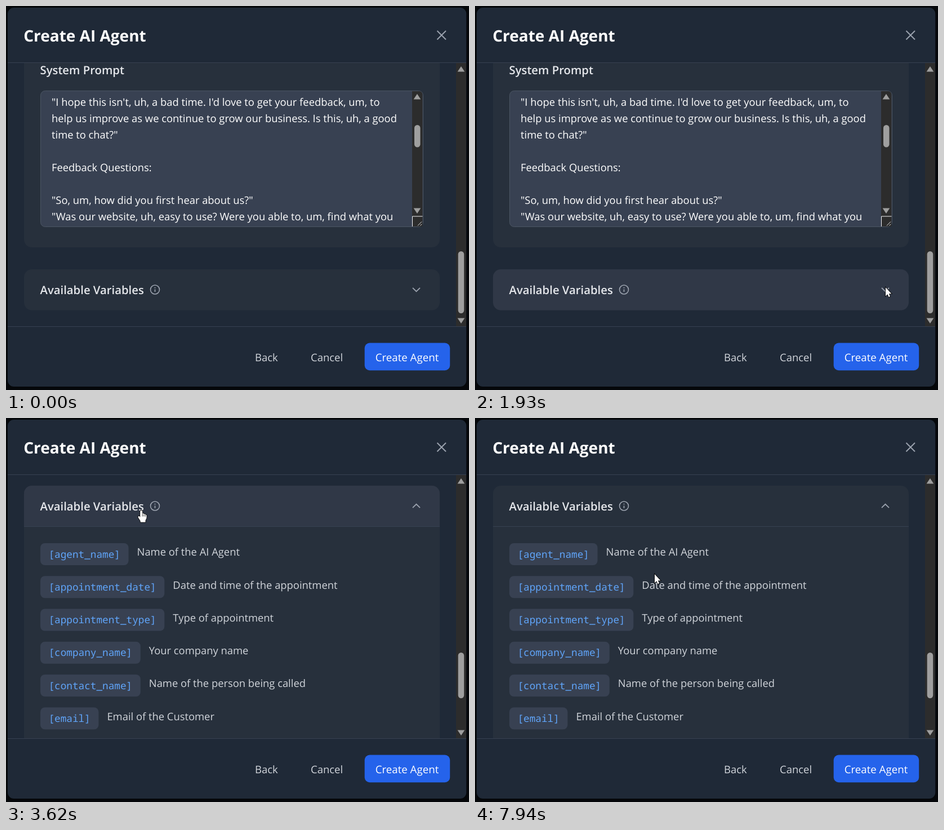
An HTML page with a canvas that plays this animation: 822x681 px, repeating every 8000 ms.

```html
<!DOCTYPE html>
<html lang="en">
<head>
<meta charset="utf-8">
<title>Create AI Agent</title>
<style>
html, body { margin: 0; width: 100%; height: 100%; overflow: hidden; background: #05070a; }
canvas { display: block; width: 822px; height: 681px; }
</style>
</head>
<body>
<canvas id="stage" width="822" height="681"></canvas>
<script>
const ctx = document.getElementById('stage').getContext('2d');
const LOOP = 8000, OPEN = 2000;
const SANS = '"Open Sans", "Noto Sans", sans-serif';
const MONO = '"Noto Sans Mono", "DejaVu Sans Mono", monospace';
const C = {
  panel: '#1f2937', card: '#27303c', hover: '#303847', line: '#374151', field: '#384152',
  edge: '#4b5563', icon: '#9ca3af', soft: '#d1d5db', head: '#e5e7eb', track: '#2c2c2c', thumb: '#9f9f9f'
};

const PROMPT = [
  '"I hope this isn\'t, uh, a bad time. I\'d love to get your feedback, um, to',
  'help us improve as we continue to grow our business. Is this, uh, a good',
  'time to chat?"', '', 'Feedback Questions:', '',
  '"So, um, how did you first hear about us?"',
  '"Was our website, uh, easy to use? Were you able to, um, find what you'
];
const VARS = [
  ['agent_name', 'Name of the AI Agent'],
  ['appointment_date', 'Date and time of the appointment'],
  ['appointment_type', 'Type of appointment'],
  ['company_name', 'Your company name'],
  ['contact_name', 'Name of the person being called'],
  ['email', 'Email of the Customer']
];
const TIP = [
  'Dynamic variables allow you', 'to personalize your agent\'s', 'responses with context-',
  'specific information that will', 'be replaced at runtime.'
];

// Pointer path: time, x, y
const PATH = [
  [390, 726, 672], [520, 724, 640], [680, 721, 580], [840, 718, 524], [1000, 717, 498],
  [1150, 718, 499], [1200, 721, 499], [1390, 729, 499], [2440, 729, 499], [2660, 700, 487],
  [2860, 638, 452], [3040, 400, 330], [3220, 194, 221], [3280, 188, 186], [3480, 212, 172],
  [3700, 256, 159], [3880, 264, 158], [7409, 264, 158], [7410, 265, 164], [7500, 267, 173],
  [7630, 276, 196], [7780, 300, 245], [7940, 319, 277], [LOOP, 319, 277]
];

const clamp = v => Math.max(0, Math.min(1, v));
const pulse = (t, on, off, d = 150) => clamp((t - on) / d) * (1 - clamp((t - off) / d));

function pointer(t) {
  if (t < PATH[0][0]) return null;
  const i = Math.max(1, PATH.findIndex(p => p[0] > t));
  const [a, b] = [PATH[i - 1], PATH[i]];
  const k = (t - a[0]) / (b[0] - a[0]);
  return { x: a[1] + (b[1] - a[1]) * k, y: a[2] + (b[2] - a[2]) * k };
}

function box(x, y, w, h, r, fill, stroke) {
  ctx.beginPath();
  ctx.roundRect(x, y, w, h, r);
  if (fill) { ctx.fillStyle = fill; ctx.fill(); }
  if (stroke) { ctx.strokeStyle = stroke; ctx.lineWidth = 1; ctx.stroke(); }
}

function text(s, x, y, size, color, weight = 400, family = SANS, align = 'left') {
  ctx.font = `${weight} ${size}px ${family}`;
  ctx.textAlign = align;
  ctx.fillStyle = color;
  ctx.fillText(s, x, y);
}

function poly(points, { stroke, fill, width = 1.7, close = false }) {
  ctx.beginPath();
  points.forEach(([x, y]) => ctx.lineTo(x, y));
  if (close) ctx.closePath();
  if (stroke) { ctx.strokeStyle = stroke; ctx.lineWidth = width; ctx.stroke(); }
  if (fill) { ctx.fillStyle = fill; ctx.fill(); }
}

function arrowhead(x, y, dir) {
  poly([[x - 5, y + 3.7 * dir], [x, y - 3.7 * dir], [x + 5, y + 3.7 * dir]],
    { fill: C.thumb, stroke: C.thumb, width: 1.4, close: true });
}

function faded(alpha, draw) {
  if (alpha <= 0) return;
  ctx.save();
  ctx.globalAlpha = alpha;
  draw();
  ctx.restore();
}

function clipped(x, y, w, h, draw) {
  ctx.save();
  ctx.beginPath();
  ctx.rect(x, y, w, h);
  ctx.clip();
  draw();
  ctx.restore();
}

function promptCard() {
  box(32, 60, 738, 368, 14, C.card);
  text('System Prompt', 60.5, 121, 20.3, C.head, 600);
  box(61.5, 150.5, 679, 241, 8, C.field, C.edge);
  clipped(62, 151, 660, 240, () =>
    PROMPT.forEach((s, i) => text(s, 81, 177 + i * 29.05, 18.37, '#fff')));
  box(721, 151, 18.5, 222, [0, 6, 0, 0], C.track);
  arrowhead(730, 161, 1);
  arrowhead(730, 363, -1);
  box(725, 211, 10.5, 39.5, 5.2, C.thumb);
  box(721, 372.5, 18.5, 18.5, 0, C.track);
  poly([[721.5, 391], [721.5, 373], [739.5, 373]], { stroke: '#f3f4f6', width: 1 });
  poly([[731, 389.5], [738, 382.5]], { stroke: '#e5e7eb', width: 1 });
  poly([[735.5, 389.5], [738, 387]], { stroke: '#e5e7eb', width: 1 });
}

function variablesHead(top, hover, open) {
  faded(hover, () => box(32, top, 738, 72.5, open ? [14, 14, 0, 0] : 14, C.hover));
  text('Available Variables', 60.5, top + 44, 20.3, C.head, 600);
  const y = top + 36;
  ctx.beginPath();
  ctx.arc(264.5, y, 8, 0, 7);
  ctx.strokeStyle = C.icon;
  ctx.lineWidth = 1.6;
  ctx.stroke();
  poly([[264.5, y - 0.5], [264.5, y + 4]], { stroke: C.icon });
  poly([[264.5, y - 4.2], [264.5, y - 2.5]], { stroke: C.icon });
  const d = open ? -3.2 : 3.2;
  poly([[722, y - d], [728.5, y + d], [735, y - d]], { stroke: C.icon, width: 1.8 });
}

function variablesList() {
  ctx.fillStyle = C.line;
  ctx.fillRect(32, 192, 738, 1);
  VARS.forEach(([name, note], i) => {
    const y = 222 + i * 58.25, label = `[${name}]`;
    const w = label.length * 10.63 + 29;
    box(61, y, w, 39, 8, C.field);
    text(label, 75.5, y + 25.5, 17.72, '#60a5fa', 400, MONO);
    text(note, 61 + w + 15, y + 22.3, 18.37, C.soft);
  });
}

function content(t) {
  if (t < OPEN) {
    promptCard();
    box(32, 467, 738, 72.5, 14, C.card);
    variablesHead(467, pulse(t, 800, LOOP), false);
    return;
  }
  box(32, 120, 738, 500, 14, C.card);
  variablesHead(120, Math.max(1 - clamp((t - OPEN) / 130), pulse(t, 3280, 7620)), true);
  variablesList();
}

function tooltip(alpha) {
  faded(alpha, () => {
    box(274.5, 136, 242.5, 140.5, 5, '#111827');
    TIP.forEach((s, i) => text(s, 395.5, 164.5 + i * 24.25, 16.02, '#fff', 400, SANS, 'center'));
  });
}

const ARROW = [[0, 0], [0, 15.4], [3.4, 12.2], [5.6, 17.2], [8, 16.1], [5.9, 11.3], [10.4, 11.3]];

function hand() {
  ctx.beginPath();
  ctx.moveTo(-2, 1.5);
  ctx.quadraticCurveTo(0, -1.5, 2, 1.5);
  ctx.lineTo(2, 6);
  ctx.quadraticCurveTo(4.4, 5, 5, 7);
  ctx.quadraticCurveTo(7, 6, 7.4, 8);
  ctx.quadraticCurveTo(9.4, 7.4, 9.5, 9.8);
  ctx.lineTo(9.3, 14);
  ctx.lineTo(7.4, 18);
  ctx.lineTo(7.4, 21);
  ctx.lineTo(-1.5, 21);
  ctx.lineTo(-1.8, 18.5);
  ctx.lineTo(-5.4, 13.2);
  ctx.quadraticCurveTo(-6.2, 9.6, -3.6, 10.4);
  ctx.lineTo(-2, 12);
  ctx.closePath();
  ctx.strokeStyle = '#000';
  ctx.lineWidth = 1.6;
  ctx.stroke();
  ctx.fillStyle = '#fff';
  ctx.fill();
  [2, 4.7, 7.2].forEach((x, i) => poly([[x, 6.5 + i], [x, 11]], { stroke: '#000', width: 0.8 }));
}

function pointerKind({ x, y }, t) {
  if (t < OPEN) {
    const onButton = y > 598 && y < 646;
    return t < 1900 && (onButton || y < 540) ? 'hand' : 'arrow';
  }
  if (y > 192) return 'arrow';
  return x > 254 && y < 167 ? 'help' : 'hand';
}

function drawPointer(p, t) {
  const kind = pointerKind(p, t);
  ctx.save();
  ctx.translate(p.x, p.y);
  if (kind === 'hand') hand();
  else poly(ARROW, { stroke: '#000', fill: '#fff', width: 1.6, close: true });
  if (kind === 'help') text('?', 13.5, 21, 11.5, '#fff', 600);
  ctx.restore();
}

function draw(t) {
  ctx.fillStyle = '#05070a';
  ctx.fillRect(0, 0, 822, 681);
  box(3, 3, 814.3, 672, 11, C.panel);
  clipped(3, 101, 814, 467, () => {
    content(t);
    ctx.fillStyle = C.track;
    ctx.fillRect(799, 101, 18, 467);
    arrowhead(808, 112, 1);
    arrowhead(808, 558, -1);
    const [y, h] = t < OPEN ? [435, 110] : [416, 81];
    box(802.7, y, 10.5, h, 5.2, C.thumb);
  });
  ctx.fillStyle = C.line;
  ctx.fillRect(3, 100, 814, 1);
  ctx.fillRect(3, 568, 814, 1);

  text('Create AI Agent', 31.2, 63, 28, '#fff', 700);
  poly([[765.5, 44], [781, 59.5]], { stroke: C.icon, width: 2 });
  poly([[781, 44], [765.5, 59.5]], { stroke: C.icon, width: 2 });

  text('Back', 442, 629.5, 18.5, C.soft);
  text('Cancel', 541, 629.5, 18.5, C.soft);
  box(636.7, 597.6, 151.5, 48.6, 9, '#2563eb');
  faded(pulse(t, 500, 640), () => box(636.7, 597.6, 151.5, 48.6, 9, '#1d4ed8'));
  text('Create Agent', 712, 629.5, 18.7, '#fff', 400, SANS, 'center');

  tooltip(pulse(t, 3720, 7490, 120));
  const p = pointer(t);
  if (p) drawPointer(p, t);
}

ctx.textRendering = 'geometricPrecision';
const start = performance.now();
function frame() {
  draw((performance.now() - start) % LOOP);
  requestAnimationFrame(frame);
}
frame();
</script>
</body>
</html>
```
